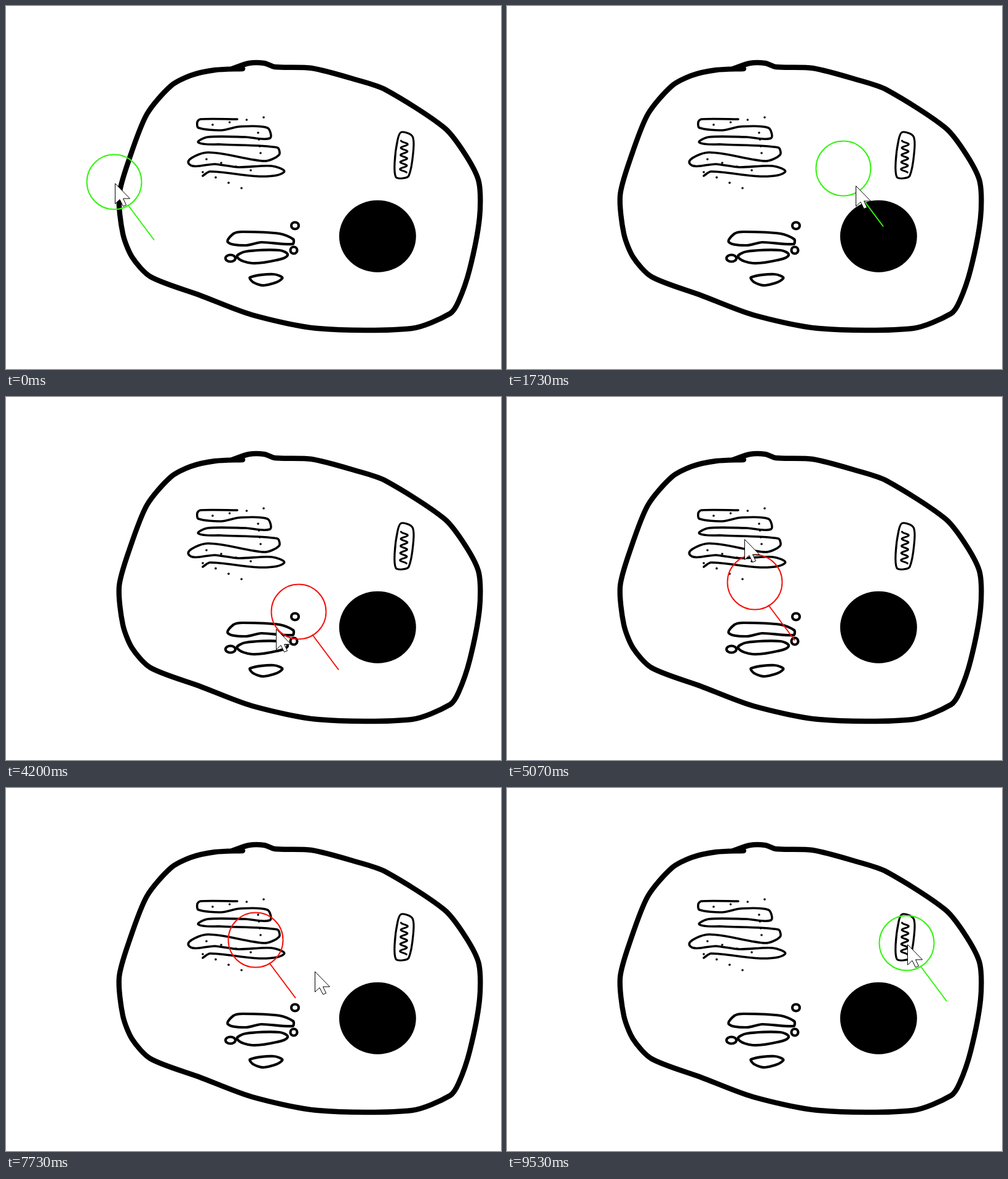
Animation of 805x590 px, one loop 9.59 s. Source, as an HTML page with a canvas:

```html
<!DOCTYPE html>
<html lang="en">
<head>
<meta charset="utf-8">
<title>Cell under a lens</title>
<style>
html, body { margin: 0; width: 100%; height: 100%; overflow: hidden; background: #fff; }
canvas { display: block; }
</style>
</head>
<body>
<canvas id="stage" width="805" height="590"></canvas>
<script>
const ctx = document.getElementById('stage').getContext('2d');
const LOOP = 9590, FPS = 15, LAG = 2, RADIUS = 44.5, TAU = Math.PI * 2;

const parse = s => s.trim().split(/\s+/).map(p => p.split(',').map(Number));
const mix = (a, b, u) => a + (b - a) * u;

// ---- Motion: each trip is first step, last step and evenly timed places.
const trips = [
  [3, 10, '360,241'],
  [15, 36, '524,250 582,328 591,387'],
  [39, 48, '626,313 633,277 659,220'],
  [52, 65, '423,386'],
  [71, 77, '382,216'],
  [81, 87, '584,357'],
  [92, 96, '649,228'],
  [101, 106, '382,235'],
  [113, 119, '501,296 571,350'],
  [123, 141, '428,398 575,268 650,252']
];

const keys = [{ step: 0, pos: [176, 286] }];
for (const [first, last, places] of trips) {
  keys.push({ step: first, pos: keys[keys.length - 1].pos });
  parse(places).forEach((pos, i, all) =>
    keys.push({ step: mix(first, last, (i + 1) / all.length), pos }));
}
keys.push({ step: 200, pos: keys[keys.length - 1].pos });

const slope = (i, axis) =>
  (keys[i + 1].pos[axis] - keys[i].pos[axis]) / (keys[i + 1].step - keys[i].step);

// Harmonic tangents: at rest beside a pause, never overshooting.
function tangent(i, axis) {
  if (i === 0 || i === keys.length - 1) return 0;
  const p = slope(i - 1, axis), q = slope(i, axis);
  return p * q <= 0 ? 0 : 2 * p * q / (p + q);
}

function placeAt(step) {
  const n = Math.max(0, step);
  const i = keys.findIndex(k => k.step > n) - 1;
  const from = keys[i], to = keys[i + 1];
  const h = to.step - from.step, u = (n - from.step) / h;
  return [0, 1].map(axis => Math.round(
    mix(from.pos[axis], to.pos[axis], u * u * (3 - 2 * u))
    + h * u * (1 - u) * ((1 - u) * tangent(i, axis) - u * tangent(i + 1, axis))));
}

// ---- Drawing: a pen line bent gently through a few points.
function pen(g, text, width, closed = false) {
  const pts = parse(text), n = pts.length, bend = 0.27;
  const at = i => pts[closed ? (i + n) % n : Math.min(n - 1, Math.max(0, i))];
  const handle = (i, reach) => {
    const a = at(i - 1), b = at(i), c = at(i + 1);
    const k = reach * bend / (Math.hypot(c[0] - a[0], c[1] - a[1]) || 1);
    return [b[0] + (c[0] - a[0]) * k, b[1] + (c[1] - a[1]) * k];
  };
  g.lineWidth = width;
  g.beginPath();
  g.moveTo(...pts[0]);
  for (let i = 0; i < (closed ? n : n - 1); i++) {
    const p = at(i), q = at(i + 1), reach = Math.hypot(q[0] - p[0], q[1] - p[1]);
    g.bezierCurveTo(...handle(i, reach), ...handle(i + 1, -reach), ...q);
  }
  g.stroke();
}

function oval(g, x, y, rx, ry = rx) {
  g.beginPath();
  g.ellipse(x, y, rx, ry, 0, 0, TAU);
}

function drawMembrane(g) {
  pen(g, `385,102 340,104 300,113 268,130 229,176 200,250 184,308 190,370 205,408
    235,440 315,470 400,502 507,524 660,524 722,500 736,480 754,428 770,345 769,286
    748,243 713,198 617,136 570,120 497,101 437,99 420,93 395,93 367,102`, 8.4);
}

function drawReticulum(g) {
  pen(g, `376,184 316,184 311,189 313,198 350,202 380,196 425,198 429,215 390,213
    328,213 313,222 350,225 441,230 444,242 420,252 328,238 297,256 340,257 378,262
    432,260 452,270 415,277 332,269 320,276`, 3.6);
  // Ribosomes lie in rows of four.
  for (const row of ['336,193 419,181', '410,206 414,239', '326,249 398,267', '320,270 383,296']) {
    const [a, b] = parse(row);
    for (let u = 0; u < 1.1; u += 1 / 3) {
      oval(g, mix(a[0], b[0], u), mix(a[1], b[1], u), 1.8);
      g.fill();
    }
  }
}

function drawGolgi(g) {
  pen(g, '361,384 370,370 385,367 445,370 467,379 466,387 415,384 390,389', 4.2, true);
  pen(g, '376,408 390,399 445,397 458,405 440,413 400,418', 4.2, true);
  pen(g, '397,441 435,436 449,443 420,454 402,449', 4.2, true);
  for (const [x, y, rx] of parse('470,357,6 468,397,5.5 365,410,8')) {
    oval(g, x, y, rx, 5.5);
    g.stroke();
  }
}

function drawMitochondrion(g) {
  pen(g, '643,205 661,212 662,240 655,276 645,280 634,278 632,255 637,217', 3.2, true);
  g.lineWidth = 3;
  g.beginPath();
  for (let u = 0; u <= 1; u += 0.01) {
    g.lineTo(648 - 2 * u - 5.5 * Math.cos(u * 4.5 * TAU), 219 + 52 * u);
  }
  g.stroke();
}

function drawCell(g) {
  g.fillStyle = '#fff';
  g.fillRect(0, 0, 805, 590);
  g.fillStyle = g.strokeStyle = '#000';
  g.lineCap = g.lineJoin = 'round';
  drawMembrane(g);
  oval(g, 604.3, 374.3, 62.5, 58.5);
  g.fill();
  drawReticulum(g);
  drawGolgi(g);
  drawMitochondrion(g);
}

function drawLens(x, y, color) {
  ctx.strokeStyle = color;
  ctx.lineWidth = 2;
  oval(ctx, x, y, RADIUS);
  ctx.moveTo(x + 22, y + 37);
  ctx.lineTo(x + 65, y + 94.5);
  ctx.stroke();
}

const arrow = new Path2D('M0 0V33L7.5 26L13 37L18 35L13 24.5H24Z');

function drawPointer(x, y) {
  ctx.save();
  ctx.translate(x, y);
  ctx.fillStyle = '#fff';
  ctx.fill(arrow);
  ctx.strokeStyle = '#000';
  ctx.lineWidth = 1;
  ctx.stroke(arrow);
  ctx.restore();
}

const cell = document.createElement('canvas');
cell.width = 805;
cell.height = 590;
drawCell(cell.getContext('2d'));

function render(now) {
  const step = Math.floor((now % LOOP) * FPS / 1000 + 0.06);
  const [lx, ly] = placeAt(step - LAG);
  const [px, py] = placeAt(step);
  const tipX = px + 1.5, tipY = py + 2.5;
  // The lens turns red once the pointer has left it.
  const away = Math.hypot(tipX - lx, tipY - ly) > RADIUS;
  ctx.drawImage(cell, 0, 0);
  drawLens(lx, ly, away ? '#f5120c' : '#34f50f');
  drawPointer(tipX, tipY);
}

const start = performance.now();
function tick() {
  render(performance.now() - start);
  requestAnimationFrame(tick);
}
tick();
</script>
</body>
</html>
```
